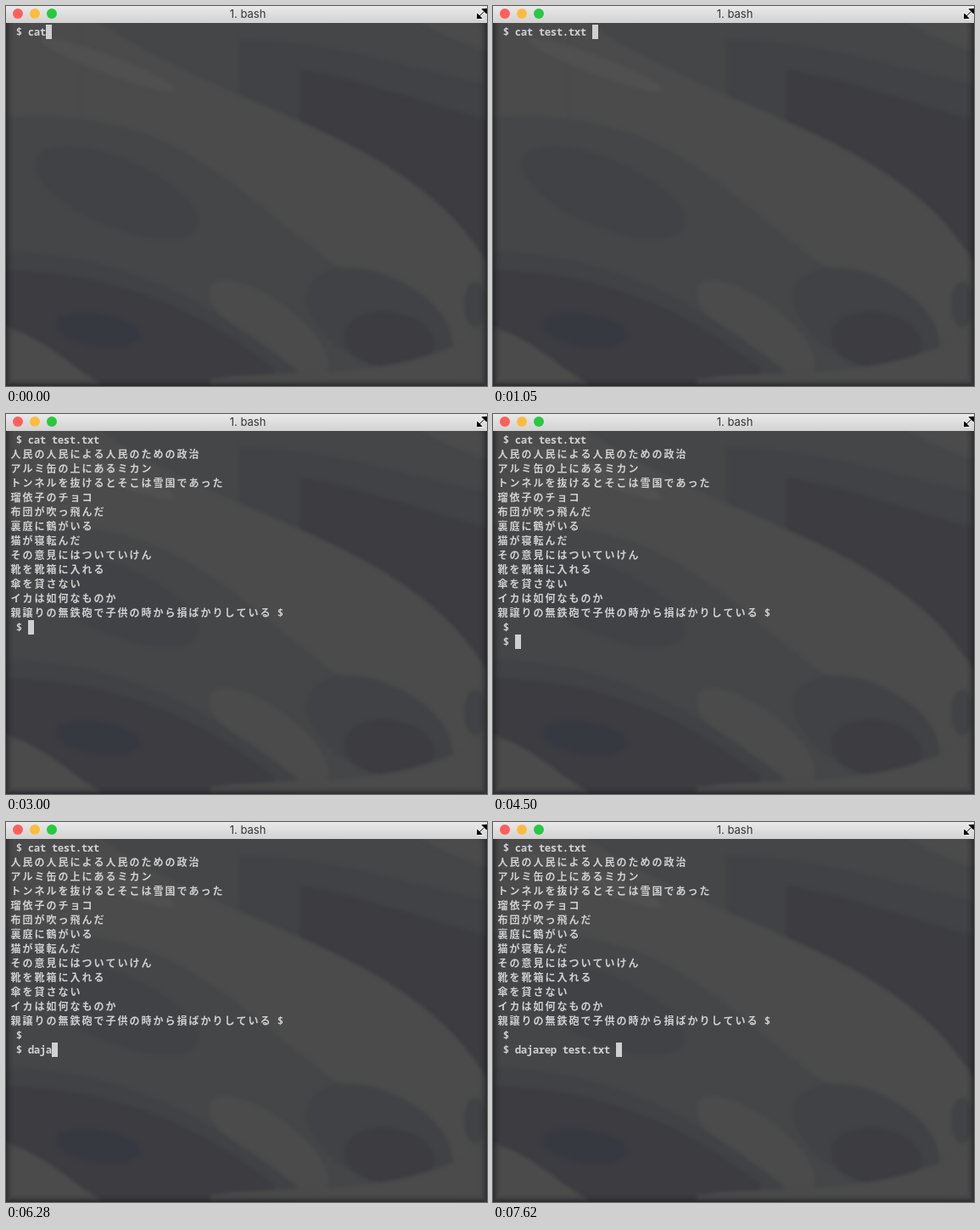
An HTML page with a canvas for the animation above (8000 ms loop, 567 by 448 pixels).

```html
<!DOCTYPE html>
<html lang="ja">
<head>
<meta charset="utf-8">
<title>Terminal</title>
<style>
html, body { margin: 0; width: 100%; height: 100%; overflow: hidden; background: #454648; }
canvas { display: block; width: 567px; height: 448px; }
</style>
</head>
<body>
<canvas id="stage" width="567" height="448"></canvas>
<script>
const W = 567, H = 448, BAR = 20, LOOP = 8000;
const LEFT = 5, TOP = 22, CELL = 7, ROW = 17;
const ASCII = '600 12.4px "Noto Sans Mono", "DejaVu Sans Mono", monospace';
const WIDE = '700 12px "Noto Sans CJK JP", "Noto Sans CJK", sans-serif';
const LIGHT = '#4b4b4b', MID = '#454648', DIM = '#414245', DARK = '#3c3c41';
const ctx = document.getElementById('stage').getContext('2d');

const output = `
人民の人民による人民のための政治
アルミ缶の上にあるミカン
トンネルを抜けるとそこは雪国であった
瑠依子のチョコ
布団が吹っ飛んだ
裏庭に鶴がいる
猫が寝転んだ
その意見にはついていけん
靴を靴箱に入れる
傘を貸さない
イカは如何なものか
親譲りの無鉄砲で子供の時から損ばかりしている $ `;

// What reaches the terminal, and when
const session = [
  [0, ' $ cat'], [150, ' '], [750, 'te'], [1050, 'st.txt '],
  [1950, output], [3000, '\n $ '], [4500, '\n $ '],
  [5390, 'da'], [6140, 'j'], [6280, 'a'], [6430, 'r'], [6580, 'e'], [6880, 'p'],
  [7030, ' '], [7330, 't'], [7480, 'e'], [7620, 'st.txt ']
];

const backdrop = document.createElement('canvas');
backdrop.width = W;
backdrop.height = H;
const g = backdrop.getContext('2d');

// Fills everything below one cubic curve
function hill(color, x0, y0, cx0, cy0, cx1, cy1, x1, y1) {
  g.fillStyle = color;
  g.beginPath();
  g.moveTo(x0, y0);
  g.bezierCurveTo(cx0, cy0, cx1, cy1, x1, y1);
  g.lineTo(x1, H);
  g.lineTo(x0, H);
  g.fill();
}

function oval(color, x, y, rx, ry, tilt = 0) {
  g.fillStyle = color;
  g.beginPath();
  g.ellipse(x, y, rx, ry, tilt, 0, Math.PI * 2);
  g.fill();
}

function drawWallpaper() {
  g.fillStyle = MID;
  g.fillRect(0, 0, W, H);
  g.filter = 'blur(2px)';

  // upper right, then the bright sweep and the slope under it
  oval(LIGHT, 535, 26, 70, 15, 0.4);
  hill(DIM, 275, 40, 380, 40, 460, 70, 580, 95);
  hill(DARK, 347, 76, 400, 82, 460, 105, 580, 138);
  g.fillStyle = LIGHT;
  g.fillRect(-9, 0, 100, H);
  hill(LIGHT, 90, 5, 260, 130, 470, 140, 570, 306);
  oval('#505050', 120, 69, 85, 11, 0.36);
  hill(MID, -9, 132, 250, 115, 260, 245, 528, 398);
  oval(DIM, 130, 220, 103, 40, 0.4);

  // lower half
  oval(LIGHT, 310, 380, 85, 32, 0.65);
  oval(DIM, 440, 370, 92, 52, 0.45);
  oval(DARK, 452, 394, 53, 33, 0.15);
  oval(DIM, 553, 352, 13, 27);
  hill(DIM, -9, 290, 140, 290, 240, 350, 342, 428);
  hill(DARK, -9, 312, 130, 312, 230, 360, 315, 428);
  oval('#373941', 108, 382, 50, 19, 0.15);
  hill(LIGHT, -9, 376, 50, 390, 80, 430, 115, 446);
  hill(LIGHT, 240, 440, 330, 425, 450, 450, 575, 378);
  g.filter = 'none';
}

// Dark rim around the window
function drawRim() {
  const depth = 10;
  for (let i = 0; i < depth; i++) {
    g.strokeStyle = `rgba(28,29,32,${0.6 * (1 - i / depth) ** 2})`;
    g.strokeRect(i + 0.5, BAR - depth + i, W - 1 - 2 * i, H - BAR + depth - 2 * i - 0.5);
  }
}

function drawBar() {
  const sheen = g.createLinearGradient(0, 0, 0, BAR);
  sheen.addColorStop(0, '#e9e9e9');
  sheen.addColorStop(1, '#d2d2d2');
  g.fillStyle = sheen;
  g.fillRect(0, 0, W, BAR);
  ['#fc605b', '#fdbc40', '#28c840'].forEach((color, i) => oval(color, 14 + i * 20, 9, 6, 6));
  g.font = '13px Inter, Roboto, sans-serif';
  g.textAlign = 'center';
  g.fillStyle = '#333';
  g.fillText('1. bash', 285, 14);
}

// Two-headed diagonal resize arrow
function drawPointer() {
  g.translate(561, 9);
  g.rotate(-Math.PI / 4);
  g.beginPath();
  g.moveTo(-6, 0);
  g.lineTo(6, 0);
  for (const side of [-1, 1]) {
    g.moveTo(side * 8, 0);
    g.lineTo(side * 4, -3.5);
    g.lineTo(side * 4, 3.5);
    g.closePath();
  }
  g.strokeStyle = '#fff';
  g.lineWidth = 2.6;
  g.stroke();
  g.strokeStyle = g.fillStyle = '#000';
  g.lineWidth = 1;
  g.stroke();
  g.fill();
}

drawWallpaper();
drawRim();
drawBar();
drawPointer();

function draw(t) {
  ctx.drawImage(backdrop, 0, 0);
  ctx.fillStyle = '#d0d0d0';
  ctx.textAlign = 'center';
  let x = LEFT, y = TOP;
  const shown = session.filter(([at]) => at <= t).map(([, text]) => text).join('');
  for (const ch of shown) {
    if (ch === '\n') {
      x = LEFT;
      y += ROW;
      continue;
    }
    const wide = ch > '\u00ff';
    const step = wide ? CELL * 2 : CELL;
    ctx.font = wide ? WIDE : ASCII;
    ctx.fillText(ch, x + step / 2 - (wide ? 0.5 : 0), y + 13);
    x += step;
  }
  ctx.fillRect(x, y, CELL, ROW);
}

const start = performance.now();
function tick() {
  draw((performance.now() - start) % LOOP);
  requestAnimationFrame(tick);
}
tick();
</script>
</body>
</html>
```
